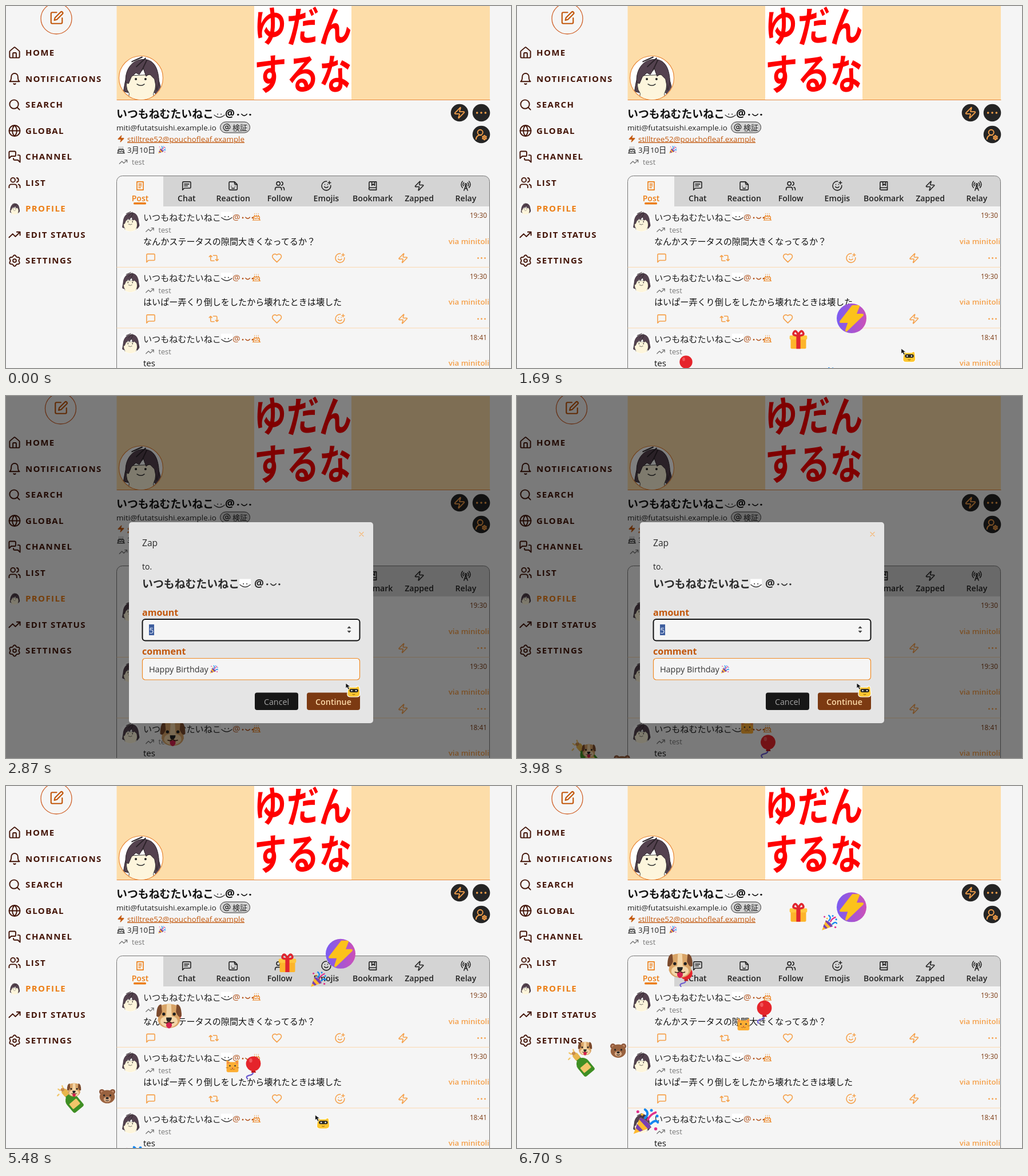
These frames come from a looping animation (883x634 px, 6.75 s). An HTML page:

```html
<!DOCTYPE html>
<html lang="ja">
<head>
<meta charset="utf-8">
<title>Birthday profile</title>
<style>
html, body { margin: 0; width: 100%; height: 100%; overflow: hidden; background: #f5f5f5; }
svg { display: block; }
text { font-family: "Open Sans", "Noto Sans CJK JP", "Noto Sans CJK", sans-serif; white-space: pre; }
</style>
</head>
<body>
<svg id="stage" width="883" height="634" viewBox="0 0 883 634"></svg>
<script>
const LOOP = 6750, OPEN = 2.5, BLUR = 5.05, CLOSE = 5.3;
const ink = '#431407', orange = '#ec7d14', amber = '#f5a04a', rust = '#c2570c', dark = '#222';

// Drawing helpers
const text = (x, y, s, size, fill = dark, weight = 400, extra = '') =>
  `<text x="${x}" y="${y}" font-size="${size}" fill="${fill}" font-weight="${weight}" ${extra}>${s}</text>`;
const rect = (x, y, w, h, fill, r = 0, extra = '') =>
  `<rect x="${x}" y="${y}" width="${w}" height="${h}" rx="${r}" fill="${fill}" ${extra}/>`;
const circle = (x, y, r, fill, extra = '') => `<circle cx="${x}" cy="${y}" r="${r}" fill="${fill}" ${extra}/>`;
const oval = (x, y, rx, ry, fill, extra = '') => `<ellipse cx="${x}" cy="${y}" rx="${rx}" ry="${ry}" fill="${fill}" ${extra}/>`;
const shape = (d, fill, extra = '') => `<path d="${d}" fill="${fill}" ${extra}/>`;
const line = (d, stroke, width = 1) =>
  `<path d="${d}" fill="none" stroke="${stroke}" stroke-width="${width}" stroke-linecap="round" stroke-linejoin="round"/>`;
const at = (x, y, k, s) => `<g transform="translate(${x} ${y}) scale(${k})">${s}</g>`;

const gear = (cx, cy, r, amp) => 'M' + Array.from({ length: 72 }, (_, i) => {
  const a = i * Math.PI / 36, q = r + amp * Math.cos(6 * a);
  return (cx + q * Math.sin(a)).toFixed(1) + ' ' + (cy - q * Math.cos(a)).toFixed(1);
}).join('L') + 'z';
const ring = (x, y, r) => `M${x - r} ${y}a${r} ${r} 0 1 0 ${2 * r} 0a${r} ${r} 0 1 0 ${-2 * r} 0`;
const bubble = 'M21 15a2 2 0 0 1-2 2H7l-4 4V5a2 2 0 0 1 2-2h14a2 2 0 0 1 2 2z';

const icons = {
  home: 'M15 21v-8a1 1 0 0 0-1-1h-4a1 1 0 0 0-1 1v8M3 10a2 2 0 0 1 .7-1.5l7-6a2 2 0 0 1 2.6 0l7 6A2 2 0 0 1 21 10v9a2 2 0 0 1-2 2H5a2 2 0 0 1-2-2z',
  bell: 'M6 8a6 6 0 0 1 12 0c0 7 3 9 3 9H3s3-2 3-9M10.3 21a2 2 0 0 0 3.4 0',
  search: ring(11, 11, 8) + 'M21 21l-4.3-4.3',
  globe: ring(12, 12, 10) + 'M2 12h20M12 2a14.5 14.5 0 0 0 0 20a14.5 14.5 0 0 0 0-20',
  channel: 'M14 9a2 2 0 0 1-2 2H6l-4 4V4a2 2 0 0 1 2-2h8a2 2 0 0 1 2 2zM18 9h2a2 2 0 0 1 2 2v11l-4-4h-6a2 2 0 0 1-2-2v-1',
  users: ring(9, 7, 4) + 'M16 21v-2a4 4 0 0 0-4-4H6a4 4 0 0 0-4 4v2M22 21v-2a4 4 0 0 0-3-3.9M16 3.1a4 4 0 0 1 0 7.8',
  trend: 'M22 7l-8.5 8.5-5-5L2 17M16 7h6v6',
  gear: gear(12, 12, 8.9, 1.2) + ring(12, 12, 3),
  edit: 'M12 3H5a2 2 0 0 0-2 2v14a2 2 0 0 0 2 2h14a2 2 0 0 0 2-2v-7M18.4 2.6a2.1 2.1 0 0 1 3 3l-9 9-4 1 1-4z',
  zap: 'M4 14a1 1 0 0 1-.8-1.6l9.9-10.2a.5.5 0 0 1 .9.4l-1.9 6A1 1 0 0 0 13 10h7a1 1 0 0 1 .8 1.6l-9.9 10.2a.5.5 0 0 1-.9-.4l1.9-6A1 1 0 0 0 11 14z',
  dots: [4, 12, 20].map(x => ring(x, 12, .9)).join(''),
  cog: ring(10, 8, 5) + 'M2 21a8 8 0 0 1 10-7.6' + gear(18, 18, 3.4, .7) + ring(18, 18, .6),
  post: 'M5 3h14v18H5zM9 8h6M9 12h6M9 16h4',
  chat: bubble + 'M7 8h10M7 12h7',
  sticker: 'M15 3H5a2 2 0 0 0-2 2v14a2 2 0 0 0 2 2h14a2 2 0 0 0 2-2V9zM15 3v4a2 2 0 0 0 2 2h4M8 13h0M16 13h0M9 16.5c2 1.5 4 1.5 6 0',
  smile: 'M22 11a10 10 0 1 1-9-9M8 14s1.5 2 4 2 4-2 4-2M9 9h0M15 9h0M16 5h6M19 2v6',
  book: 'M4 19V5a2 2 0 0 1 2-2h14v18H6a2 2 0 0 1 0-5h14M10 3v8l3-3 3 3V3',
  tower: ring(12, 9, 2) + 'M4.9 16.1C1 12.2 1 5.8 4.9 1.9M7.8 4.7a6 6 0 0 0-.8 7.5M19.1 1.9c3.9 3.9 3.9 10.2 0 14.1M16.2 4.8c2 2 2.3 5.1.8 7.5M9.5 18h5M8 22l4-11 4 11',
  reply: bubble,
  repeat: 'M2 9l3-3 3 3M13 18H7a2 2 0 0 1-2-2V6M22 15l-3 3-3-3M11 6h6a2 2 0 0 1 2 2v10',
  heart: 'M19 14c1.5-1.5 3-3.2 3-5.5A5.5 5.5 0 0 0 16.5 3c-1.8 0-3 .5-4.5 2-1.5-1.5-2.7-2-4.5-2A5.5 5.5 0 0 0 2 8.5c0 2.3 1.5 4 3 5.5l7 7z',
  cake: 'M20 21v-8a2 2 0 0 0-2-2H6a2 2 0 0 0-2 2v8M4 16s.5-1 2-1 2.5 2 4 2 2.5-2 4-2 2.5 2 4 2 2-1 2-1M2 21h20M7 8v3M12 8v3M17 8v3M7 4h0M12 4h0M17 4h0',
  mail: ring(12, 12, 4) + 'M16 8v5a3 3 0 0 0 6 0v-1a10 10 0 1 0-4 8'
};
const icon = (name, x, y, size, color, width = 2) =>
  at(x, y, size / 24, `<g transform="translate(-12 -12)">${line(icons[name], color, width)}</g>`);

const avatar = (x, y, r, edge = 'none') => at(x, y, r / 39,
  circle(0, 0, 39, '#fff', `stroke="${edge}" stroke-width="1.2"`) + '<g clip-path="url(#disc)">' +
  shape('M-24-8Q-29 8-31 24L-22 26-18 0zM24-10Q34 4 36 26L27 30 20 20 18-4z', '#54424f', 'stroke="#2b2228"') +
  shape('M-22-4Q-30 16-21 27L-22 44H24L22 28Q30 12 23-6z', '#fdf5dc', 'stroke="#333"') +
  shape('M-27 8C-29-14-16-34 6-33C24-32 31-16 32 8L28 22 24 2 15-7 9-3 4-17-3-6-9-9-17-2-22 10z', '#54424f', 'stroke="#2b2228"') +
  line('M-16-29L2-37M-8-20L8-35M2-14L10-31', '#2b2228', 2) +
  circle(-9, 2, 2, '#222') + circle(8, 2, 2, '#222') + line('M-7 11q7 5 13 0', '#333', 1.5) + '</g>');

// Kana followed by a small drawn smile and a face
function userName(x, y, s, weight, color, faceColor, gap = 0, box = true) {
  const e = x + 9 * s, f = e + 20 + gap, m = y - s * .3;
  return text(x, y, 'いつもねむたいねこ', s, color, weight) +
    (box ? rect(e, y - 15, 20, 15, '#fff') : '') +
    line(`M${e + 1} ${y - 5}q9 8 18 0`, '#333', 1.4) + circle(e + 7, y - 6.5, 1, '#333') + circle(e + 13, y - 6.5, 1, '#333') +
    text(f, y - 1, '@', s, faceColor, weight) +
    circle(f + 1.2 * s, m, s * .09, faceColor) + circle(f + 2.32 * s, m, s * .09, faceColor) +
    line(`M${f + 1.52 * s} ${m - 1}q${s * .25} ${s * .3} ${s * .5} 0`, faceColor, s * .09);
}

// Emoji, each drawn in a box of 36 around its centre
const dog = shape('M-13-15Q0-20 13-15L16 6Q13 17 0 17T-16 6z', '#d9a467') +
  shape('M-3-18H3L4 0Q14 2 12 10 8 16 0 16T-12 10Q-14 2-4 0z', '#f3d6a8') +
  shape('M-11-17Q-18-17-18 0-14 4-10-6zM11-17Q18-17 18 0 14 4 10-6z', '#7b4a2d') +
  shape('M-4 9h8v5Q0 21-4 14z', '#d5214f') + circle(-7.5, -3, 2.2, '#222') + circle(7.5, -3, 2.2, '#222') +
  shape('M-4 2h8Q4 7 0 8T-4 2z', '#222') + line('M0 7Q-2 11-7 9M0 7Q2 11 7 9', '#4a2a1a', 1.3);
const bear = circle(-12, -10, 6, '#8a5438') + circle(12, -10, 6, '#8a5438') + circle(-12, -10, 3, '#c48a68') + circle(12, -10, 3, '#c48a68') +
  oval(0, 1, 17, 15, '#99623f') + oval(0, 7, 8, 6, '#d8ab86') + oval(0, 4, 3.4, 2.4, '#222') +
  circle(-7, -2, 2, '#222') + circle(7, -2, 2, '#222') + line('M-3 9Q0 11 3 9', '#222', 1.3);
const cat = shape('M-16-17L-6-11H6L16-17V13Q15 16 12 16H-12Q-15 16-16 13z', '#fdae33') + shape('M-14-13l5 3-5 5zM14-13l-5 3 5 5z', '#ee7c5c') +
  circle(-7, -1, 2, '#333') + circle(7, -1, 2, '#333') + shape('M-2 4h4L0 7z', '#c8456b') +
  line('M0 7q-3 4-6 1M0 7q3 4 6 1M-17 4h5M17 4h-5', '#9b5b1a', 1.2);
const gift = rect(-15, -3, 30, 20, '#fdb52a', 2) + rect(-17, -9, 34, 8, '#ffc83d', 2) + rect(-4, -9, 8, 26, '#e0252f') +
  line('M0-9Q-13-8-9-15T0-9Q5-22 9-15T0-9', '#e0252f', 4);
const balloon = line('M-2 14Q2 20-7 22T-11 29', '#6a5ad0', 2.4) + shape('M-3 12h6l2 5h-9z', '#b81820') + circle(0, 0, 14, '#e5242b') +
  oval(-5, -6, 3, 4, '#f2565b');
const popper = shape('M-17 17L-8-6Q4-2 8 8z', '#ffb92e') + shape('M-14 9L-8 14-4 12-12 3zM-9-3L3 10 8 8Q2-3-8-6z', '#7a3fb0') +
  line('M-1-5Q6-12-1-17M7 3Q14-4 17 1', '#1687f0', 3.2) + line('M3-3Q6-10 14-13', '#e0308c', 3) +
  circle(-11, -14, 2, '#e0308c') + circle(8, -16, 2, '#1687f0') + circle(16, -8, 2, '#1687f0') + circle(14, 10, 2.2, '#e0308c') + circle(-5, -10, 1.7, '#ffb92e');
const bottle = '<g transform="rotate(-40)">' + shape('M-4-14H4V-5Q10-1 10 5V19Q10 22 7 22H-7Q-10 22-10 19V5Q-10-1-4-5z', '#3f8f24') +
  rect(-7, 6, 14, 10, '#f3c66a', 1) + rect(-4.5, -16, 9, 10, '#e8b64c', 2) + rect(-3, -20, 6, 5, '#c98b4a', 2) + '</g>' +
  line('M-15-12l-3-2M-11-16l-1-3M-17-6l-2 2', '#f3c66a', 2);
const badge = circle(0, 0, 26, 'url(#violet)', 'id="disk"') +
  shape('M2-21H12L6-6H19L-9 21-4 6H-19z', '', 'id="bolt" stroke-width="4" stroke-linejoin="round"');

// Rising emoji: drawing, x, height at time zero, speed in px/s, scale
const floats = [
  [balloon, 295.5, 723.3, 59, .8],
  [dog, 285, 799.4, 72.3, 1.22],
  [gift, 492, 707.5, 72.4, .9],
  [popper, 546, 784.5, 81.3, .76],
  [cat, 396, 819.6, 60, .65],
  [balloon, 432.5, 924.8, 80, .92],
  [bottle, 112, 832, 52, 1.15],
  [dog, 119, 858.6, 59.5, .68],
  [bear, 177, 902.4, 65.5, .78],
  [popper, 225, 949.8, 54, 1.25],
  [badge, 585, 660, 66.8, 1]
];

const menu = ['home HOME', 'bell NOTIFICATIONS', 'search SEARCH', 'globe GLOBAL', 'channel CHANNEL', 'users LIST',
  'face PROFILE', 'trend EDIT STATUS', 'gear SETTINGS'].map((m, i) => {
    const y = 82 + 45.5 * i, cut = m.indexOf(' '), name = m.slice(0, cut), face = name === 'face';
    return (face ? avatar(15, y, 10.5) : icon(name, 15, y, 23, ink)) +
      text(34, y + 5.4, m.slice(cut + 1), 15, face ? orange : ink, 700, 'letter-spacing="1.4"');
  }).join('');

const tabs = ['post Post', 'chat Chat', 'sticker Reaction', 'users Follow', 'smile Emojis', 'book Bookmark', 'zap Zapped', 'tower Relay']
  .map((s, i) => {
    const [name, label] = s.split(' '), x = 234.5 + 81.35 * i, c = i ? dark : orange;
    return icon(name, x, 315, 19, c) + text(x, 342, label, 14.1, c, 600, 'text-anchor="middle"');
  }).join('');

const status = (x, y) => icon('trend', x, y, 16, '#777') + text(x + 15, y + 4.5, 'test', 12.7, '#777');

const post = (dy, time, body) => `<g transform="translate(0 ${dy})">` + avatar(217.5, 377, 18) +
  userName(240, 375.5, 15.1, 400, dark, '#b3521a') + icon('cake', 438, 369, 16, orange, 1.8) +
  text(841, 371, time, 11.8, '#7c3a12', 400, 'text-anchor="end"') + status(251.5, 392) +
  text(240, 417.5, body, 15.1, '#111') + text(845, 416.5, 'via minitoli', 13.3, amber, 600, 'text-anchor="end"') +
  ['reply', 'repeat', 'heart', 'smile', 'zap'].map((n, i) => icon(n, 253 + 110.3 * i, 441.5, 19, amber)).join('') +
  icon('dots', 831.5, 441.5, 18, amber) + line('M194 457.5H845', '#fbd9b0') + '</g>';

const lettering = ['ゆだん', 'するな'].map((s, row) => [...s].map((c, i) =>
  `<text transform="translate(${462 + 57 * i} ${35 + 84 * row}) skewY(-6) scale(1 1.28)" y="21" font-size="57" font-weight="900" fill="#f00" text-anchor="middle">${c}</text>`
).join('')).join('');

const button = (x, y, name) => circle(x, y, 15.3, '#252525') + icon(name, x, y, 22, amber);

const page = rect(0, 0, 883, 634, '#f5f5f5') +
  '<g id="compose">' + circle(88, 22, 27, 'none', 'stroke="#d0622a" stroke-width="1.3"') + icon('edit', 88.5, 21, 26, rust) + '</g>' + menu +
  rect(193.5, 0, 652.5, 164, '#fddda9') + rect(434, 0, 170, 164, '#fff') + `<g clip-path="url(#sign)">${lettering}</g>` +
  line('M194 164.5H846', '#e8873a') + avatar(236, 126, 38.5, '#e8893a') +
  userName(193, 196, 18.9, 700, '#111', '#111', 0, false) +
  text(193, 217.5, 'miti@futatsuishi.example.io', 13.5) +
  rect(374.5, 203, 52, 19, '#d4d4d4', 9.5, 'stroke="#333"') + icon('mail', 386, 212.5, 14, dark) + text(396, 217.5, '検証', 13, dark, 500) +
  at(201, 232.5, .58, `<g transform="translate(-12 -12)">${shape(icons.zap, rust, `stroke="${rust}"`)}</g>`) +
  text(212, 237.5, 'stilltree52@pouchofleaf.example', 13.4, rust, 400, 'text-decoration="underline"') +
  icon('cake', 201, 252, 15, dark) + text(212, 256.5, '3月10日', 13.3) + at(272.5, 252, .37, popper) + status(205, 273) +
  button(793, 187, 'zap') + button(831, 187, 'dots') + button(831, 225, 'cog') +
  '<g clip-path="url(#card)">' + rect(275, 298, 571, 53, '#d4d4d4') + '</g>' + rect(193.5, 297.5, 652, 400, 'none', 10, 'stroke="#777"') +
  tabs + rect(223, 344, 22, 3.4, orange, 1.5) +
  post(0, '19:30', 'なんかステータスの隙間大きくなってるか？') +
  post(106.5, '19:30', 'はいぱー弄くり倒しをしたから壊れたときは壊した') +
  post(213.5, '18:41', 'tes');

const field = (y, id) => rect(238.5, y, 380, 37.5, '#f5f5f5', 5, `id="${id}" stroke="#f08a24" stroke-width="1.2"`);
const modal = rect(0, 0, 883, 634, '#000', 0, 'opacity=".5"') + rect(215, 221, 427, 352, '#e5e5e5', 5) +
  text(238, 263, 'Zap', 15.6, '#2b2b2b', 500) + line('M618 238.5l7 7M625 238.5l-7 7', '#f5b878', 1.2) + text(238, 304, 'to.', 14) +
  userName(238, 335.5, 18.9, 700, '#2a2a2a', '#2a2a2a', 6) +
  text(238, 384.5, 'amount', 16, rust, 700) + field(391, 'amount') +
  '<g id="focus">' + rect(250, 400, 9, 19, '#3f5f9f') + shape('M596.5 407l3.5-4 3.5 4zM596.5 411l3.5 4 3.5-4z', '#444') + '</g>' +
  text(250.3, 415.5, '5', 14, '#333', 400, 'id="digit"') +
  text(238, 452.5, 'comment', 16, rust, 700) + field(459.5, 'comment') + text(250, 484, 'Happy Birthday', 14.4, '#333') + at(363.5, 479, .4, popper) +
  rect(435, 519.5, 76, 30.5, '#171717', 4) + text(473, 541, 'Cancel', 14.3, '#a3a3a3', 500, 'text-anchor="middle"') +
  rect(526, 519.5, 93, 30.5, '#7c3a12', 4) + text(572.5, 541, 'Continue', 14.3, '#fcd9a8', 600, 'text-anchor="middle"');

const pointer = shape('M4 8Q4 4 8 7H18Q23 3 24 8L25 18Q25 24 19 24H9Q2 24 3 18z', '#fdc62f', 'stroke="#fff" stroke-width="1.2"') +
  rect(6.5, 10, 15.5, 6, '#2c2a22', 3) + circle(10.5, 13, 1.2, '#fff') + circle(18, 13, 1.2, '#fff') + line('M12 19.5q2 1.5 4 0', '#7a5510') +
  `<g id="arrow">${shape('M0 0V9l2.3-2 2.2 4 2-1-2-4H8z', '#111', 'stroke="#fff" stroke-width=".7"')}</g>` +
  `<g id="hand">${shape('M-1 0Q0-2 1.5 0L3 4Q7 4 8 7V11H2L-2 6Q-1 5 1 6z', '#fff', 'stroke="#222" stroke-width=".9"')}</g>`;

const gradient = (id, from, to) => `<linearGradient id="${id}"><stop stop-color="${from}"/><stop offset="1" stop-color="${to}"/></linearGradient>`;
const $ = id => document.getElementById(id);
$('stage').innerHTML = `<defs>
  <clipPath id="disc"><circle r="38.4"/></clipPath>
  <clipPath id="sign"><rect x="434" width="170" height="164"/></clipPath>
  <clipPath id="card"><rect x="193.5" y="297.5" width="652" height="400" rx="10"/></clipPath>
  ${gradient('violet', '#7a5cf2', '#cc50b8')}${gradient('bright', '#c558f0', '#8c7cff')}
  </defs>` + page + `<g id="floats">${floats.map(f => `<g>${f[0]}</g>`).join('')}</g><g id="modal">${modal}</g><g id="pointer">${pointer}</g>`;

// Pointer path: seconds, x, y
const path = [[.45, 790, 670], [.6, 745, 632], [.77, 669, 618], [1.06, 602, 597], [1.4, 602, 590], [1.7, 672, 600], [2.1, 595, 515],
  [2.31, 593, 505], [2.5, 594, 503], [4, 594, 503], [4.3, 527, 545], [4.6, 496, 543], [5.35, 496, 543], [5.65, 606, 625], [5.8, 620, 670]];
function pointerAt(t) {
  const i = path.findIndex(k => k[0] > t);
  if (i < 1) return path[i ? path.length - 1 : 0].slice(1);
  const [a, b] = [path[i - 1], path[i]], p = (t - a[0]) / (b[0] - a[0]), e = p * p * (3 - 2 * p);
  return [a[1] + (b[1] - a[1]) * e, a[2] + (b[2] - a[2]) * e];
}

const show = (id, on) => $(id).setAttribute('visibility', on ? 'inherit' : 'hidden');
const set = (id, attrs) => Object.entries(attrs).forEach(([k, v]) => $(id).setAttribute(k, v));

function draw(now) {
  const t = now % LOOP / 1000, open = t >= OPEN && t < CLOSE, focus = t < BLUR, [px, py] = pointerAt(t);
  const hover = !open && Math.hypot(px - 585, py - (660 - 66.8 * t)) < 26;
  floats.forEach(([art, x, y, v, k], i) => {
    const scale = art === badge && hover ? 1.08 : k;
    $('floats').children[i].setAttribute('transform', `translate(${x + (open ? 6.5 : 0)} ${y - v * t}) scale(${scale})`);
  });
  const gold = hover ? '#fff01a' : '#fcc21b';
  set('bolt', { fill: gold, stroke: gold });
  set('disk', { fill: hover ? 'url(#bright)' : 'url(#violet)' });
  set('compose', { transform: `translate(${open ? 7.5 : 0} 0)` });
  show('modal', open);
  show('focus', focus);
  set('amount', { stroke: focus ? '#111' : '#f08a24', 'stroke-width': focus ? 2 : 1.2 });
  set('digit', { fill: focus ? '#dfe6f5' : '#333' });
  set('pointer', { transform: `translate(${px} ${py})` });
  show('hand', hover);
  show('arrow', !hover);
  requestAnimationFrame(() => draw(performance.now()));
}
draw(performance.now());
</script>
</body>
</html>
```
